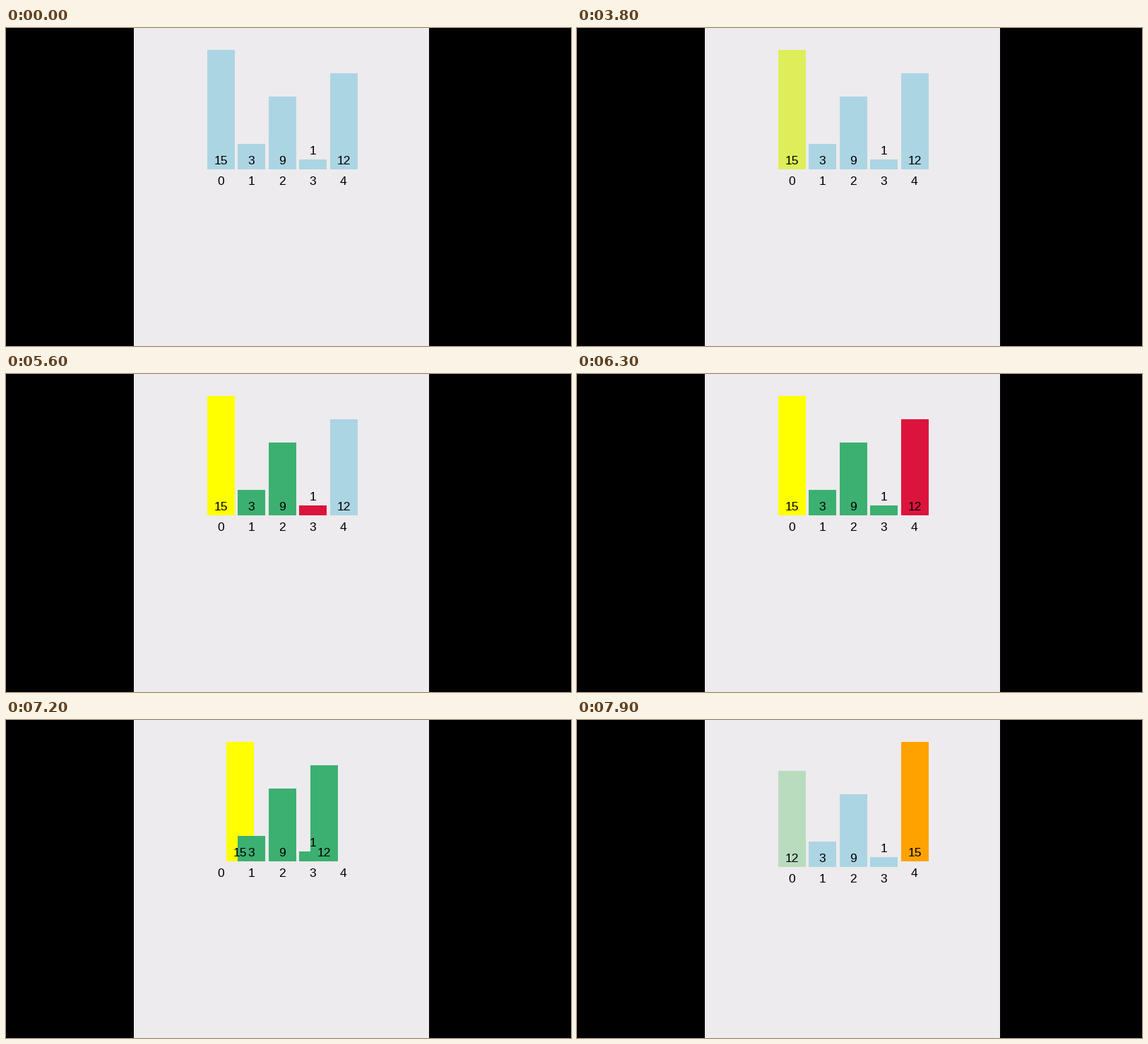
Write a matplotlib script that moves like this. It is 800x450 px and loops after 8000 ms.

```python
import matplotlib.pyplot as plt
import numpy as np
from matplotlib.animation import FuncAnimation
from matplotlib.colors import to_rgb
from matplotlib.patches import Rectangle

STEP = 100
FRAMES = 80
BASE = 200
PITCH, WIDTH, LEFT = 43.5, 39, 284.5
VALUES = [15, 3, 9, 1, 12]

BLUE, YELLOW, RED = "#acd5e3", "#ffff00", "#dc143c"
GREEN, ORANGE = "#3cb071", "#ffa200"
EASE = [0.16, 0.6, 1.0]

# Colour fades: start time, bar, new colour
FADES = [(3700, 0, YELLOW), (4000, 1, RED)]
for k in (1, 2, 3, 4):
    start = 4000 + 700 * k
    FADES.append((start, k, GREEN))
    if k < 4:
        FADES.append((start, k + 1, RED))
FADES += [(7700, 0, ORANGE)] + [(7700, k, BLUE) for k in (1, 2, 3, 4)]
FADES.append((7900, 4, YELLOW))

SWAP_START = 7200
DROP_START, DROP = 7900, 50


def progress(t, start):
    """Eased share of a transition that began at the given time."""
    if t < start:
        return 0.0
    return EASE[min(int(t - start) // STEP, len(EASE) - 1)]


def color_at(bar, t):
    color = np.array(to_rgb(BLUE))
    for start, k, name in FADES:
        if k == bar:
            color = color + (np.array(to_rgb(name)) - color) * progress(t, start)
    return np.clip(color, 0, 1)


def height(value):
    return 11.1 * value + 2.8


plt.rcParams["font.family"] = "Liberation Sans"
fig = plt.figure(figsize=(8, 4.5), dpi=100, facecolor="black")
ax = fig.add_axes([0, 0, 1, 1])
ax.set_xlim(0, 800)
ax.set_ylim(450, 0)
ax.axis("off")
ax.add_patch(Rectangle((180.6, 0), 418.6, 450, fc="#edebed", lw=0))


def label(x, y, text):
    return ax.text(x, y, text, size=12.6, ha="center", va="baseline",
                   color="black", zorder=5)


bars, numbers, indices = [], [], []
for i, value in enumerate(VALUES):
    x = LEFT + PITCH * i
    h = height(value)
    bars.append(ax.add_patch(Rectangle((x, BASE - h), WIDTH, h, lw=0, zorder=2)))
    numbers.append(label(x + WIDTH / 2, BASE - 7, str(value)))
    indices.append(label(x + WIDTH / 2 - 0.3, BASE + 22.5, str(i)))


def update(frame):
    t = frame * STEP
    swap = 4 * progress(t, SWAP_START)
    drop = DROP * progress(t, DROP_START)
    slots = [swap, 1, 2, 3, 4 - swap]
    for i, value in enumerate(VALUES):
        x = LEFT + PITCH * slots[i]
        h = height(value)
        base = BASE + (drop if i != 0 else 0)
        bars[i].set_xy((x, base - h))
        bars[i].set_facecolor(color_at(i, t))
        # The number sits above a bar too short to hold it
        numbers[i].set_position((x + WIDTH / 2, base - (7 if h > 20 else 21)))
        shift = drop if i != 4 else 0
        indices[i].set_y(BASE + 22.5 + shift)
    return bars + numbers + indices


anim = FuncAnimation(fig, update, frames=FRAMES, interval=STEP,
                     repeat=True, repeat_delay=0, blit=False)
plt.show()
```
